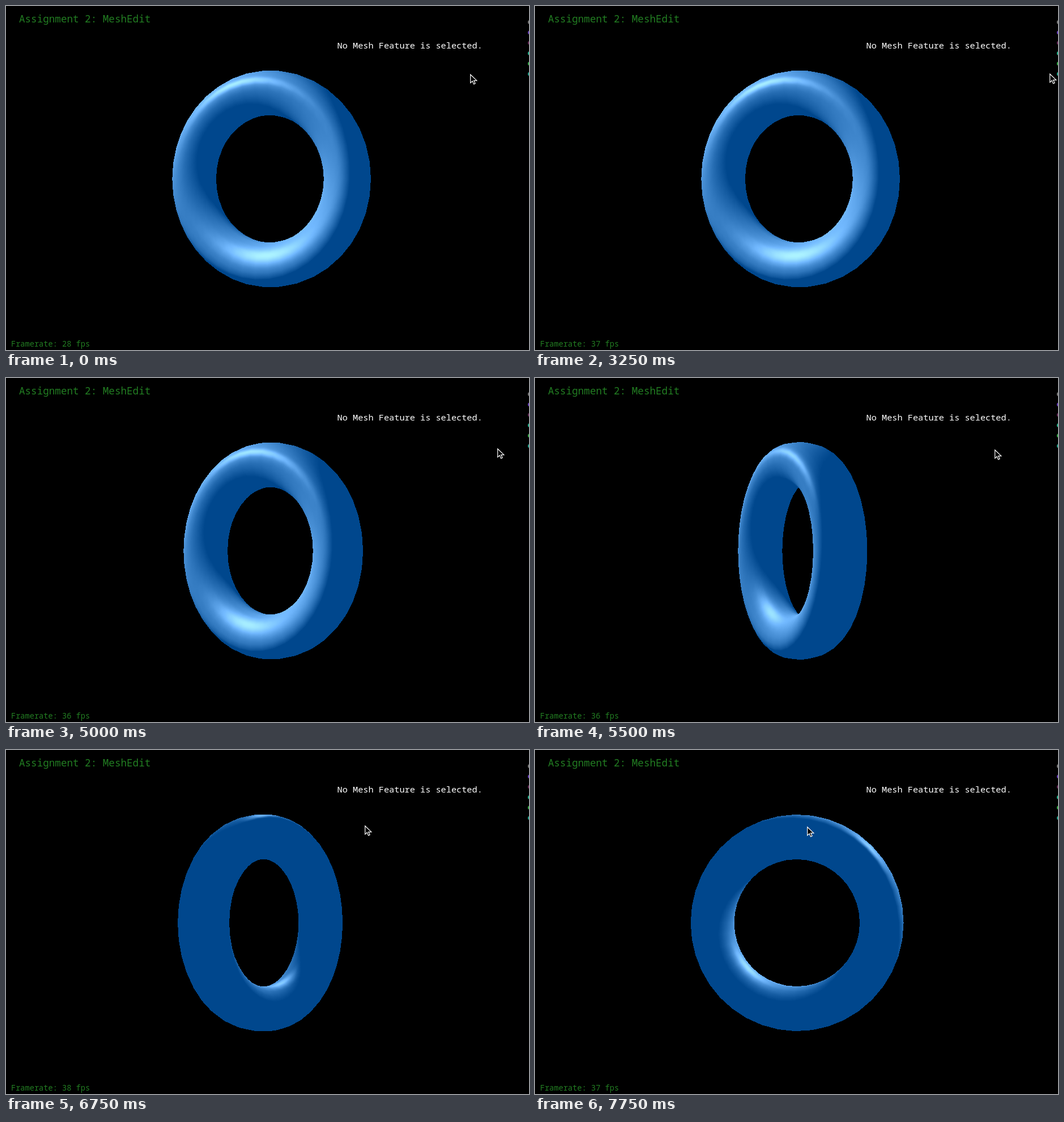
An HTML page with a canvas that plays this animation: 923 by 607 pixels, repeating every 8000 ms.

```html
<!DOCTYPE html>
<html lang="en">
<head>
<meta charset="utf-8">
<title>MeshEdit</title>
<style>
  html, body { margin: 0; width: 100%; height: 100%; overflow: hidden; background: #000; }
  canvas, svg { position: absolute; left: 0; top: 0; width: 923px; height: 607px; }
  text { font-family: "Roboto Mono", "Noto Sans Mono", "DejaVu Sans Mono", monospace; white-space: pre; }
  .green { fill: #227d22; }
</style>
</head>
<body>
<canvas id="view" width="923" height="607"></canvas>
<svg viewBox="0 0 923 607">
  <text class="green" x="23" y="29" font-size="17.6">Assignment 2: MeshEdit</text>
  <text x="584.6" y="75" font-size="15.26" fill="#fff">No Mesh Feature is selected.</text>
  <text class="green" id="rate" x="9" y="600.5" font-size="13.65"></text>
  <g id="dots"></g>
  <path id="cursor" d="M-.3 0V14.7L3.2 11.5L5.6 16.9L8.1 15.8L5.7 10.6H10.8Z" fill="#000" stroke="#fff" stroke-width="1.2"/>
</svg>
<script>
const W = 923, H = 607, LOOP = 8000, STEP = 250;
const CENTER = [460.7, 305], FOCAL = 1300;
const RING = 40, TUBE = 24;
const LIGHT = [-560, 670, -480];   // radial, up, axial
const BASE = [0, 71, 141];

// ms, pointer x, pointer y, turn in degrees away from edge-on
const MOVES = [
  [0, 820, 121, 61.8], [250, 838, 104, 61.8], [750, 892, 96, 61.8],
  [1250, 872, 85, 61.8], [1500, 884, 74, 61.8], [2000, 850, 89, 61.8],
  [2500, 909, 117, 61.8], [3250, 909, 120, 61.8], [4000, 903, 121, 61.8],
  [4250, 903, 121, 61.8], [4500, 898, 123, 60.2], [5000, 868, 125, 48.5],
  [5500, 812, 127, 26.2], [6000, 736, 132, -0.4], [6750, 634, 134, -41],
  [7750, 481, 136, -98]
];
const RATES = [[0, 28], [1000, 35], [3000, 37], [4000, 38], [5000, 36], [6000, 38], [7000, 37]];

const ctx = document.getElementById('view').getContext('2d');
const image = ctx.createImageData(W, H);
const depth = new Float32Array(W * H);
const rate = document.getElementById('rate');
const cursor = document.getElementById('cursor');

document.getElementById('dots').innerHTML =
  ['#777', '#6a3fc0', '#6b2a5c', '#22b58c', '#35b04a', '#22a58c'].map((color, i) =>
    `<circle cx="924.5" cy="${28.5 + i * 18.3}" r="3.6" fill="${color}"/>`).join('');

// Egg-shaped tube section, widest a little outside its middle; the ring is slightly slimmer sideways
const HALF_WIDTH = 44, BULGE = 10;
const mesh = [];
for (let i = 0; i < RING; i++) {
  for (let j = 0; j < TUBE; j++) {
    const t = i / RING * 2 * Math.PI, p = j / TUBE * 2 * Math.PI;
    const [ct, st, cp, sp] = [Math.cos(t), Math.sin(t), Math.cos(p), Math.sin(p)];
    const slim = 1.1 * ct * ct, tube = 39 - slim;
    const radius = 151.1 - slim + tube * cp + BULGE * sp * sp;
    const nr = HALF_WIDTH * cp, nw = tube * sp - 2 * BULGE * sp * cp, len = Math.hypot(nr, nw);
    mesh.push({
      pos: [radius * ct, radius * st, HALF_WIDTH * sp],
      normal: [nr * ct / len, nr * st / len, nw / len]
    });
  }
}

function turn([u, y, w], angle) {
  const s = Math.sin(angle), c = Math.cos(angle);
  return [u * s + w * c, y, u * c - w * s];
}

// Amount of white added to the base colour
function shade(px, py, pz, nx, ny, nz, light) {
  const lx = light[0] - px, ly = light[1] - py, lz = light[2] - pz;
  const ex = -px, ey = -py, ez = FOCAL - pz;
  const n = Math.hypot(nx, ny, nz), l = Math.hypot(lx, ly, lz), e = Math.hypot(ex, ey, ez);
  const diffuse = (nx * lx + ny * ly + nz * lz) / (n * l);
  if (diffuse <= 0) return 0;
  const hx = lx / l + ex / e, hy = ly / l + ey / e, hz = lz / l + ez / e;
  const spec = Math.max(0, (nx * hx + ny * hy + nz * hz) / (n * Math.hypot(hx, hy, hz)));
  return 118 * diffuse + 80 * spec ** 26 * Math.min(1, diffuse * 6);
}

function fillTriangle(a, b, c, light) {
  const area = (b.x - a.x) * (c.y - a.y) - (b.y - a.y) * (c.x - a.x);
  if (Math.abs(area) < 1e-6) return;
  const x0 = Math.ceil(Math.min(a.x, b.x, c.x) - .5), x1 = Math.floor(Math.max(a.x, b.x, c.x) - .5);
  const y0 = Math.ceil(Math.min(a.y, b.y, c.y) - .5), y1 = Math.floor(Math.max(a.y, b.y, c.y) - .5);
  for (let y = y0; y <= y1; y++) {
    for (let x = x0; x <= x1; x++) {
      const X = x + .5, Y = y + .5;
      const kb = ((X - a.x) * (c.y - a.y) - (Y - a.y) * (c.x - a.x)) / area;
      const kc = ((b.x - a.x) * (Y - a.y) - (b.y - a.y) * (X - a.x)) / area;
      const ka = 1 - kb - kc;
      if (ka < -1e-6 || kb < -1e-6 || kc < -1e-6) continue;
      const mix = (key, i) => ka * a[key][i] + kb * b[key][i] + kc * c[key][i];
      const z = mix('pos', 2), at = y * W + x;
      if (z <= depth[at]) continue;
      depth[at] = z;
      const glow = shade(mix('pos', 0), mix('pos', 1), z,
        mix('normal', 0), mix('normal', 1), mix('normal', 2), light);
      for (let k = 0; k < 3; k++) image.data[at * 4 + k] = BASE[k] + glow;
      image.data[at * 4 + 3] = 255;
    }
  }
}

function drawTorus(degrees) {
  const angle = degrees * Math.PI / 180, light = turn(LIGHT, angle);
  image.data.fill(0);
  depth.fill(-1e9);
  const points = mesh.map(v => {
    const pos = turn(v.pos, angle), scale = FOCAL / (FOCAL - pos[2]);
    return {
      pos, normal: turn(v.normal, angle),
      x: CENTER[0] + pos[0] * scale, y: CENTER[1] - pos[1] * scale
    };
  });
  const at = (i, j) => points[i % RING * TUBE + j % TUBE];
  for (let i = 0; i < RING; i++) {
    for (let j = 0; j < TUBE; j++) {
      const a = at(i, j), b = at(i + 1, j), c = at(i + 1, j + 1), d = at(i, j + 1);
      fillTriangle(a, b, c, light);
      fillTriangle(a, c, d, light);
    }
  }
  ctx.putImageData(image, 0, 0);
}

function poseAt(ms) {
  const next = MOVES.findIndex(row => row[0] > ms);
  if (next < 0) return MOVES[MOVES.length - 1];
  const from = MOVES[next - 1], to = MOVES[next];
  const k = (ms - from[0]) / (to[0] - from[0]);
  return from.map((v, i) => v + (to[i] - v) * k);
}

let shownStep = -1, shownAngle = null;
function tick() {
  const step = Math.floor(performance.now() % LOOP / STEP);
  if (step !== shownStep) {
    shownStep = step;
    const ms = step * STEP, [, x, y, angle] = poseAt(ms);
    cursor.setAttribute('transform', `translate(${x} ${y})`);
    rate.textContent = `Framerate: ${RATES.filter(row => row[0] <= ms).pop()[1]} fps`;
    if (angle !== shownAngle) drawTorus(shownAngle = angle);
  }
  requestAnimationFrame(tick);
}
tick();
</script>
</body>
</html>
```
